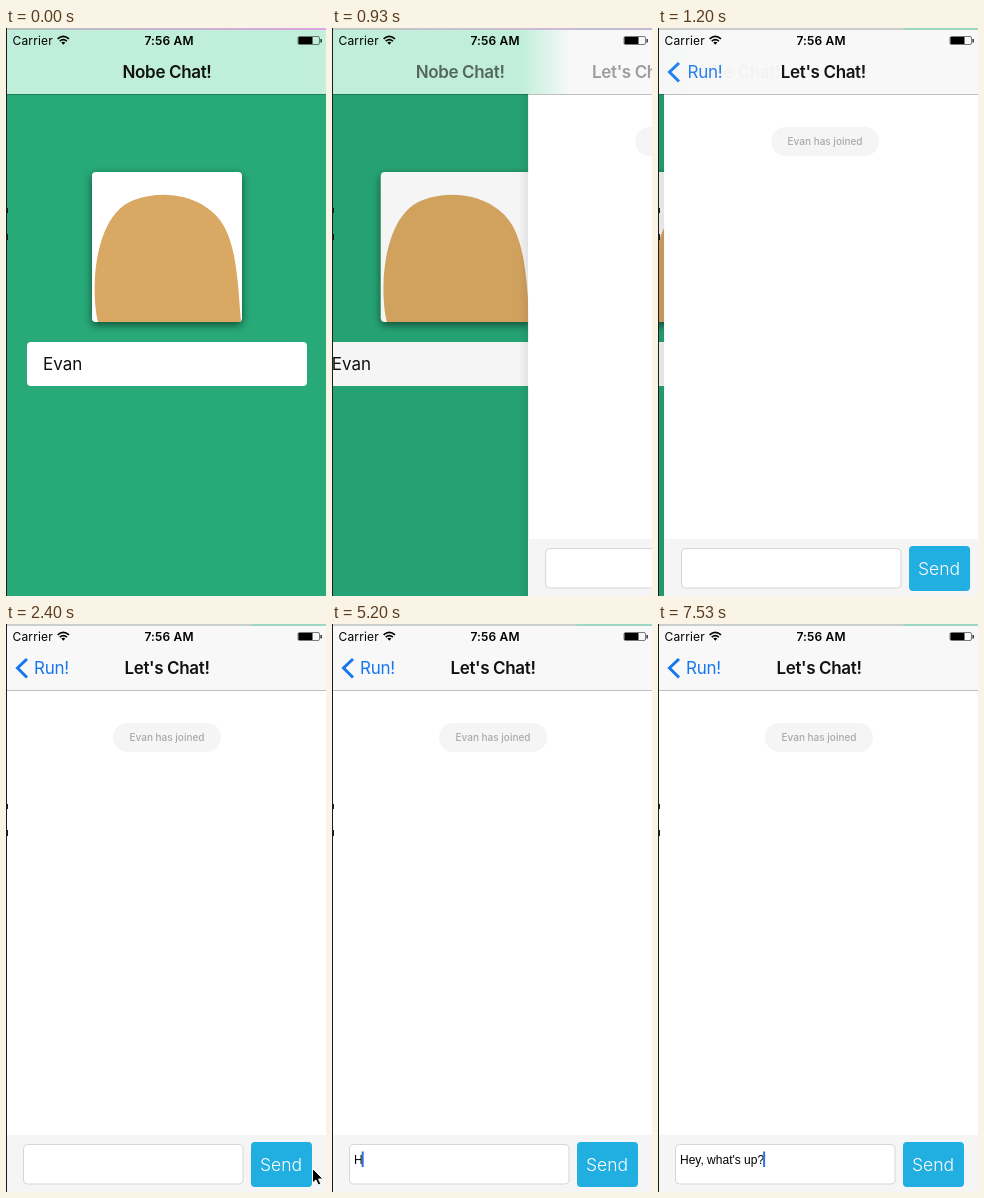
An HTML page that plays this animation: 320 by 568 pixels, repeating every 8000 ms.

```html
<!DOCTYPE html>
<html lang="en">
<head>
<meta charset="utf-8">
<title>Chat</title>
<style>
  html, body { margin: 0; width: 100%; height: 100%; overflow: hidden; background: #fff; }
  svg { display: block; font-family: Inter, sans-serif; }
  .title { font-size: 17px; font-weight: 600; letter-spacing: -.35px; text-anchor: middle; fill: #111; }
  .status { font-size: 12px; letter-spacing: .15px; }
  .caret { fill: #2f6fe0; }
  #back { font-size: 17px; letter-spacing: -.3px; fill: #1677f0; }
  #message { font: 12px "Liberation Sans", Arial, sans-serif; white-space: pre; }
</style>
</head>
<body>
<svg width="320" height="568" viewBox="0 0 320 568">
  <defs>
    <linearGradient id="mint" gradientUnits="userSpaceOnUse" x1="312" x2="362">
      <stop stop-color="#bfeeda"/><stop offset="1" stop-color="#bfeeda" stop-opacity="0"/>
    </linearGradient>
    <linearGradient id="edge">
      <stop stop-opacity="0"/><stop offset="1" stop-opacity=".12"/>
    </linearGradient>
    <linearGradient id="pink">
      <stop stop-color="#b4c4bc"/><stop offset="1" stop-color="#dca6e2"/>
    </linearGradient>
    <filter id="drop" x="-20%" y="-20%" width="140%" height="140%">
      <feDropShadow dx="0" dy="3" stdDeviation="4" flood-opacity=".55"/>
    </filter>
  </defs>

  <g id="login">
    <rect width="420" height="568" fill="#27a978"/>
    <rect x="86" y="144" width="150" height="150" rx="4" fill="#fff" filter="url(#drop)"/>
    <path d="M92 294C84 262 88 186 128 172S206 174 219 200S232 262 235 294Z" fill="#d9a862"/>
    <rect x="21" y="314" width="280" height="44" rx="4" fill="#fff"/>
    <text id="name" x="37" y="342" font-size="17" fill="#111">Evan</text>
    <rect id="nameCaret" class="caret" y="325" width="2" height="21"/>
  </g>
  <rect id="dim" width="320" height="568"/>

  <g id="chat">
    <rect id="shadow" x="-10" width="10" height="568" fill="url(#edge)"/>
    <rect width="320" height="568" fill="#fff"/>
    <rect x="107" y="99" width="108" height="29" rx="14.5" fill="#f5f5f5"/>
    <text x="161" y="117" font-size="10" font-weight="500" text-anchor="middle" fill="#a9a9a9">Evan has joined</text>
    <rect y="511" width="320" height="57" fill="#f5f5f5"/>
    <rect x="17.5" y="520.5" width="219.5" height="39.5" rx="4" fill="#fff" stroke="#d6d6d6"/>
    <rect x="245" y="518" width="61" height="45" rx="4" fill="#21aee1"/>
    <text x="275" y="547" font-size="17.5" font-weight="300" text-anchor="middle" fill="#fff">Send</text>
    <text id="message" x="22" y="540"></text>
    <rect id="messageCaret" class="caret" y="527.5" width="2" height="15.5"/>
  </g>

  <rect width="320" height="66" fill="#f8f8f8"/>
  <rect id="tint" width="362" height="66" fill="url(#mint)"/>
  <rect y="66" width="320" height="1" fill-opacity=".25"/>
  <text id="oldTitle" class="title" x="161" y="50">Nobe Chat!</text>
  <text id="newTitle" class="title" x="161" y="50">Let's Chat!</text>
  <path id="chevron" d="M21 35L11.5 44L21 53.5" fill="none" stroke="#1677f0" stroke-width="3"/>
  <text id="back" x="28" y="50">Run!</text>

  <rect width="320" height="2" fill="#c9cfcc"/>
  <rect x="245" width="75" height="2" fill="#9fd8c0"/>
  <rect id="topLine" width="320" height="2" fill="url(#pink)"/>
  <text class="status" x="6.5" y="16.5">Carrier</text>
  <text class="status" x="163" y="16.5" font-weight="600" text-anchor="middle">7:56 AM</text>
  <g fill="none" stroke="#000" stroke-width="1.6">
    <path d="M51.6 10.8Q57.3 5.8 63 10.8M53.7 13.1Q57.3 10 60.9 13.1"/>
    <rect x="292" y="8.5" width="21.5" height="8" rx="1.5" stroke="#444" stroke-width=".7"/>
  </g>
  <path d="M55.3 14.6Q57.3 13 59.3 14.6L57.3 16.8ZM292.5 9h14v7h-14ZM314.5 11h1.2v3.5h-1.2Z"/>
  <path d="M0 0h1v568h-1ZM0 180h2v5h-2ZM0 206h2v6h-2Z" fill="#1c1c1c"/>
  <path id="pointer" d="M0 0V14.5L3.4 11.4L5.8 16.5L8.3 15.3L6 10.5H10.5Z" stroke="#fff"/>
</svg>
<script>
const LOOP = 8000, TICK = 1000 / 15;
const MESSAGE = "Hey, what's up?";
// Tick at which each character of the message is typed
const KEYS = [78, 81, 83, 89, 90, 93, 94, 96, 98, 98, 102, 103, 107, 108, 113];
// Caret blinks: [fade-in start, fade-in length, fade-out start]
const NAME_BLINKS = [[0, 3, 7]];
const MESSAGE_BLINKS = [[48, 2, 52], [60, 2, 67], [75, 2, 120]];

const $ = id => document.getElementById(id);
const clamp = v => Math.min(1, Math.max(0, v));
const set = (id, attrs) => {
  for (const key in attrs) $(id).setAttribute(key, attrs[key]);
};
const shift = (id, x, y = 0) => set(id, { transform: `translate(${x} ${y})` });
const blink = (n, blinks) => Math.max(...blinks.map(([start, length, end]) =>
  Math.min(clamp((n - start) / length), 1 - clamp((n - end) / 4))));

// Critically damped spring of the page push
function push(n) {
  if (n >= 21) return 1;
  const s = Math.max(0, n * TICK - 855) * 0.0171;
  return 1 - (1 + s) * Math.exp(-s);
}

function draw(n) {
  const p = push(n), rest = 1 - p;
  shift('login', -96 * p);
  shift('chat', 320 * rest);
  set('dim', { opacity: 0.1 * p });
  set('shadow', { opacity: p > 0 ? rest : 0 });

  shift('tint', -320 * p);
  set('tint', { opacity: 1 - p ** 4 });
  shift('oldTitle', -85 * p);
  set('oldTitle', { opacity: rest });
  shift('newTitle', 231 * rest);
  set('newTitle', { opacity: p });
  set('chevron', { opacity: clamp((p - 0.68) / 0.32) });
  shift('back', 85 * rest);
  set('back', { opacity: clamp((p - 0.72) / 0.28) });
  set('topLine', { opacity: rest });

  set('nameCaret', { x: 36.5 + $('name').getComputedTextLength(), opacity: blink(n, NAME_BLINKS) });
  $('message').textContent = MESSAGE.slice(0, KEYS.filter(key => key <= n).length);
  set('messageCaret', {
    x: 21 + $('message').getComputedTextLength(),
    opacity: blink(n, MESSAGE_BLINKS)
  });

  const k = clamp((n - 36) / 8), ease = k * k * (3 - 2 * k);
  shift('pointer', 306.5 - 176 * ease, 544.5 + 6 * ease);
  set('pointer', { opacity: n >= 36 && n < 49 ? 1 : 0 });
}

function frame() {
  const t = performance.now() % LOOP;
  draw(Math.floor((t + 4) / TICK) % 120);
  requestAnimationFrame(frame);
}
frame();
</script>
</body>
</html>
```
